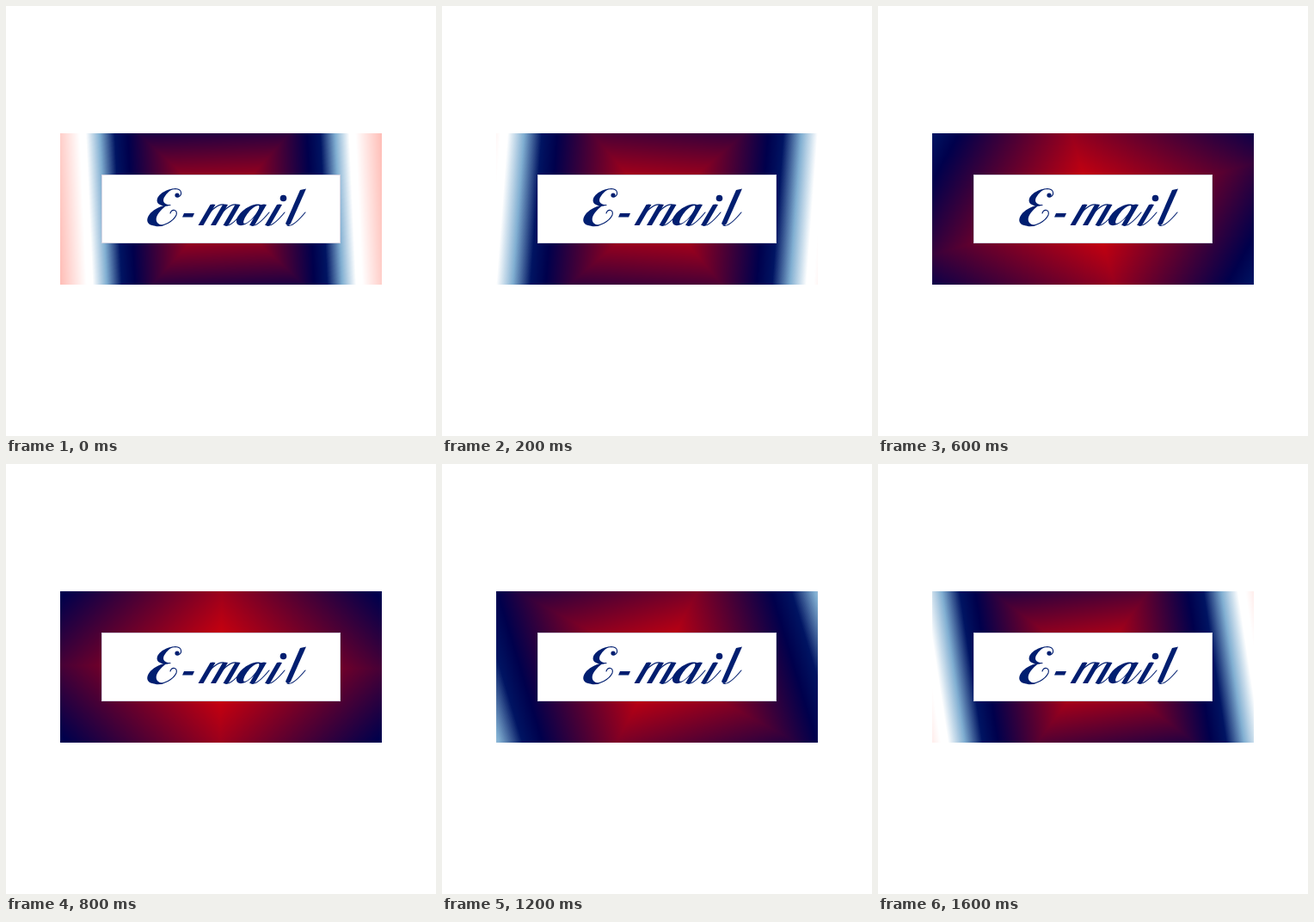
Animation of 500x500 px, one loop 1.8 s. Source, as an HTML page with a canvas:

```html
<!DOCTYPE html>
<html lang="en">
<head>
<meta charset="utf-8">
<title>E-mail</title>
<style>
html, body { margin: 0; width: 100%; height: 100%; overflow: hidden; background: #fff; }
canvas, svg { position: absolute; left: 0; top: 0; }
canvas { left: 63px; top: 148px; }
.ink { fill: #001e70; }
.hair { fill: none; stroke: #001e70; stroke-width: 1.1; stroke-linecap: round; }
</style>
</head>
<body>
<canvas id="glow" width="374" height="176"></canvas>
<svg width="500" height="500" viewBox="0 0 500 500" role="img" aria-label="E-mail">
  <defs>
    <!-- slanted pen stroke, foot at 0,0 -->
    <path id="stem" d="M0 0L14 -24Q17 -25 20 -24L6 0Z"/>
    <path id="arch" class="hair" d="M4 -3Q20 -26 30 -24"/>
    <path id="tail" class="hair" d="M2 0Q8 3 23 -15"/>
  </defs>
  <rect x="111.5" y="196.5" width="277" height="79" fill="#fff" stroke="#d4d4e2"/>
  <g class="ink">
    <!-- E -->
    <path d="M194 212.5C178 215 171 227 179 231C183 233 188 233 191 231.5C183 231 181 226 185 221Q188 216 194 212.5Z"/>
    <path d="M187 231.5C167 235 159 250 168 254.5Q175 257 182 255C173 253 170 245 187 231.5Z"/>
    <circle cx="199" cy="220" r="2.6"/>
    <path class="hair" d="M199 222C205 222 206 213 197 212.5Q190 213 183 219M191 231.5Q182 231 173 239M174 255.5C183 257 195 250 198 243C200 237 193 235 191 241"/>
    <path d="M207 241H219L217 245.5H205Z"/>
    <!-- m -->
    <use href="#stem" x="223.5" y="255"/>
    <use href="#stem" x="238" y="255"/>
    <use href="#stem" x="252.5" y="255"/>
    <use href="#arch" x="223.5" y="255"/>
    <use href="#arch" x="238" y="255"/>
    <use href="#tail" x="252.5" y="255"/>
    <!-- a -->
    <path fill-rule="evenodd" d="M298 232C289 226 270 239 268 249C267 258 278 256 284 250Q294 242 298 232ZM294 232C297 236 283 253 277 253C273 251 285 232 294 232Z"/>
    <use href="#stem" x="283" y="255"/>
    <use href="#tail" x="283" y="255"/>
    <!-- i -->
    <use href="#stem" x="301" y="255"/>
    <use href="#tail" x="301" y="255"/>
    <circle cx="322.5" cy="223.5" r="3.8"/>
    <!-- l -->
    <path d="M325 253L342 214L349 212.5L331 253Q328 257 325 253Z"/>
    <use href="#tail" x="325" y="255"/>
  </g>
</svg>
<script>
const W = 374, H = 176, LOOP = 1800, STEP = 200, STEPS = 8;

// colours by distance from the centre
const stops = [
  [0, [232, 0, 4]], [102, [0, 0, 76]], [117, [0, 20, 98]],
  [134, [128, 174, 209]], [150, [255, 255, 255]],
  [157, [255, 255, 255]], [200, [255, 160, 150]]
];

function colorAt(d) {
  const i = Math.max(1, stops.findIndex(s => s[0] >= d));
  const [d0, a] = stops[i - 1], [d1, b] = stops[i];
  const k = (d - d0) / (d1 - d0);
  return a.map((v, n) => v + (b[n] - v) * k);
}

const ramp = Array.from({ length: 801 }, (_, i) => colorAt(i / 4));
const ctx = document.getElementById("glow").getContext("2d");
const img = ctx.createImageData(W, H);

// a quarter turn per loop at uneven speed, zooming out and back
const turn = n => 1 - 90 * n / STEPS + 7 * Math.sin(2 * Math.PI * (n + 0.3) / STEPS);
const zoom = n => 1.02 + 0.83 * Math.sin(Math.PI * n / STEPS) ** 1.6;

// square gradient around the centre
function draw(n) {
  const a = turn(n) * Math.PI / 180;
  const c = Math.cos(a) / zoom(n), s = Math.sin(a) / zoom(n);
  let p = 0;
  for (let j = 0; j < H; j++) {
    for (let i = 0; i < W; i++) {
      const x = i + 0.5 - W / 2, y = j + 0.5 - H / 2;
      const d = Math.max(Math.abs(x * c - y * s), Math.abs(x * s + y * c));
      const rgb = ramp[Math.min(800, Math.round(d * 4))];
      for (const v of rgb) img.data[p++] = v;
      img.data[p++] = 255;
    }
  }
  ctx.putImageData(img, 0, 0);
}

let shown = -1;
const start = performance.now();
function tick(now) {
  const slot = Math.floor(Math.max(0, now - start) % LOOP / STEP);
  const n = slot > 6 ? slot - 1 : slot; // the seventh pose holds for two steps
  if (n !== shown) draw(shown = n);
  requestAnimationFrame(tick);
}
tick(start);
</script>
</body>
</html>
```
